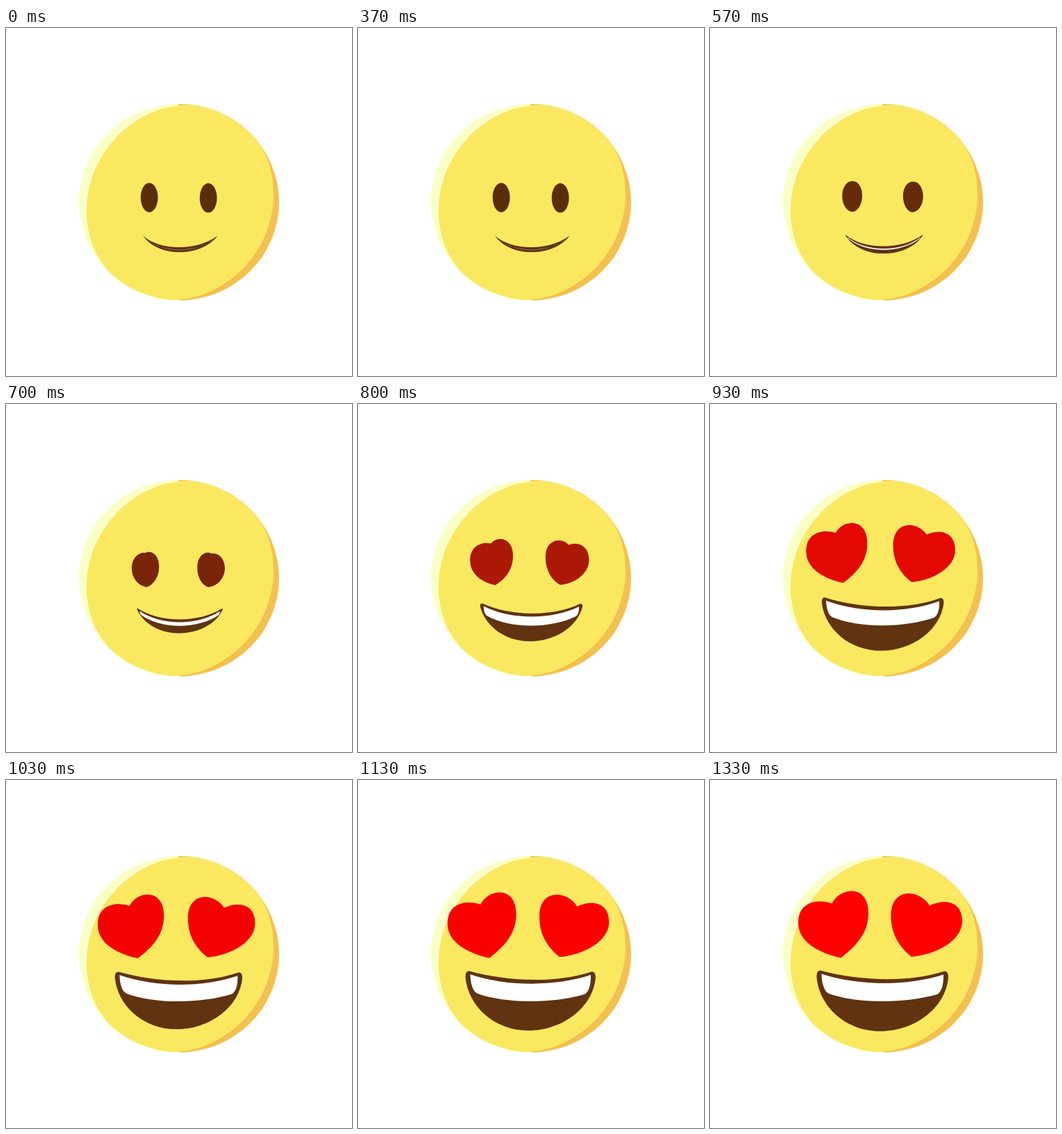
These frames come from a looping animation (498 by 500 pixels, 1660 ms). An HTML page:

```html
<!DOCTYPE html>
<html lang="en">
<head>
<meta charset="utf-8">
<title>Smile to heart eyes</title>
<style>
  html, body { margin: 0; width: 100%; height: 100%; overflow: hidden; background: #fff; }
  svg { display: block; width: 498px; height: 500px; }
</style>
</head>
<body>
<svg viewBox="0 0 498 500">
  <clipPath id="disc"><ellipse cx="249" cy="250.2" rx="143.5" ry="140.9"/></clipPath>
  <path fill="#faffc8" d="M249 109A144 141.2 0 0 0 249 391.4Z"/>
  <path fill="#f4c04f" d="M249 109A144 141.2 0 0 1 249 391.4Z"/>
  <g clip-path="url(#disc)">
    <ellipse cx="250.5" cy="250.6" rx="143.8" ry="130.7" transform="rotate(-57 250.5 250.6)" fill="#fae960"/>
  </g>
  <path id="leftEye"/>
  <path id="rightEye"/>
  <path id="mouth" fill="#613310"/>
  <path id="teeth" fill="#fff"/>
</svg>
<script>
const LOOP = 1660, START = 336.8, STEP = 33.2, STEPS = 30;

// Ellipse as four curves: top, left, bottom, right
function oval(cx, cy, rx, ry) {
  const k = 0.5523, x = rx * k, y = ry * k;
  return `M${cx} ${cy - ry}
    C${cx - x} ${cy - ry} ${cx - rx} ${cy - y} ${cx - rx} ${cy}
    C${cx - rx} ${cy + y} ${cx - x} ${cy + ry} ${cx} ${cy + ry}
    C${cx + x} ${cy + ry} ${cx + rx} ${cy + y} ${cx + rx} ${cy}
    C${cx + rx} ${cy - y} ${cx + x} ${cy - ry} ${cx} ${cy - ry}Z`;
}

const EYE_COLORS = [[91, 46, 11], [255, 0, 0]];

const morphs = [
  { id: "leftEye", colors: EYE_COLORS,
    from: oval(206.2, 243.6, 12.4, 21.1),
    to: `M175.5 177.5 C158 171 127 173 127 205 C127 234 159 249 188.5 255.5
      C208 240 228 222 228 191 C228 150 188 153 175.5 177.5Z` },
  { id: "rightEye", colors: EYE_COLORS,
    from: oval(291.2, 244.2, 12.4, 21.1),
    to: `M316 180.5 C302 157 260.5 153 260.5 195 C260.5 222 273 240 290 254
      C325 251 363 231 363 203 C363 172 335 171 316 180.5Z` },
  { id: "mouth",
    from: `M197 298.5 C197 298.5 197 298.5 197 298.5 C222 320.5 275 320.5 304.5 298.5
      C304.5 298.5 304.5 298.5 304.5 298.5 C293 314 272 322 250 322
      C228 322 208 314 197 298.5Z`,
    to: `M153.5 283 C153.5 277 155 273 160 274 C215 288.5 285 291.5 336 275
      C340 274 343 276 343 283 C340 327 295 361 245 361
      C195 361 157 325 153.5 283Z` },
  { id: "teeth",
    from: `M200 302 C225 324 275 324 301 302 C301 302 301 302 301 302
      C275 324.4 225 324.4 200 302 C200 302 200 302 200 302Z`,
    to: `M160.5 278.5 C215 296.5 285 296 336 279.5 C336.5 292 334 304 327 308
      C280 321.5 212 321.5 171 307 C163 303 160.5 288 160.5 278.5Z` }
];

const NUM = /-?\d+(\.\d+)?/g;
const mix = (a, b, p) => a + (b - a) * p;
for (const m of morphs) {
  m.node = document.getElementById(m.id);
  m.start = m.from.match(NUM).map(Number);
}

// cubic-bezier(.71, 0, .21, 1)
function ease(u) {
  if (u <= 0 || u >= 1) return u <= 0 ? 0 : 1;
  let lo = 0, hi = 1, s = 0.5;
  for (let i = 0; i < 24; i++) {
    s = (lo + hi) / 2;
    const x = 3 * 0.71 * s * (1 - s) ** 2 + 3 * 0.21 * s * s * (1 - s) + s ** 3;
    if (x < u) lo = s; else hi = s;
  }
  return s * s * (3 - 2 * s);
}

// Steps fall on whole hundredths of a second
function progress(t) {
  const n = Math.floor((Math.floor(t / 10) * 10 + 5 - START) / STEP);
  return ease(n / STEPS);
}

function draw(p) {
  for (const m of morphs) {
    let i = 0;
    m.node.setAttribute("d", m.to.replace(NUM, v => mix(m.start[i++], +v, p).toFixed(2)));
    if (m.colors) {
      const [a, b] = m.colors;
      m.node.setAttribute("fill", `rgb(${a.map((c, j) => Math.round(mix(c, b[j], p)))})`);
    }
  }
}

const origin = performance.now();
function tick() {
  draw(progress((performance.now() - origin) % LOOP));
  requestAnimationFrame(tick);
}
tick();
</script>
</body>
</html>
```
